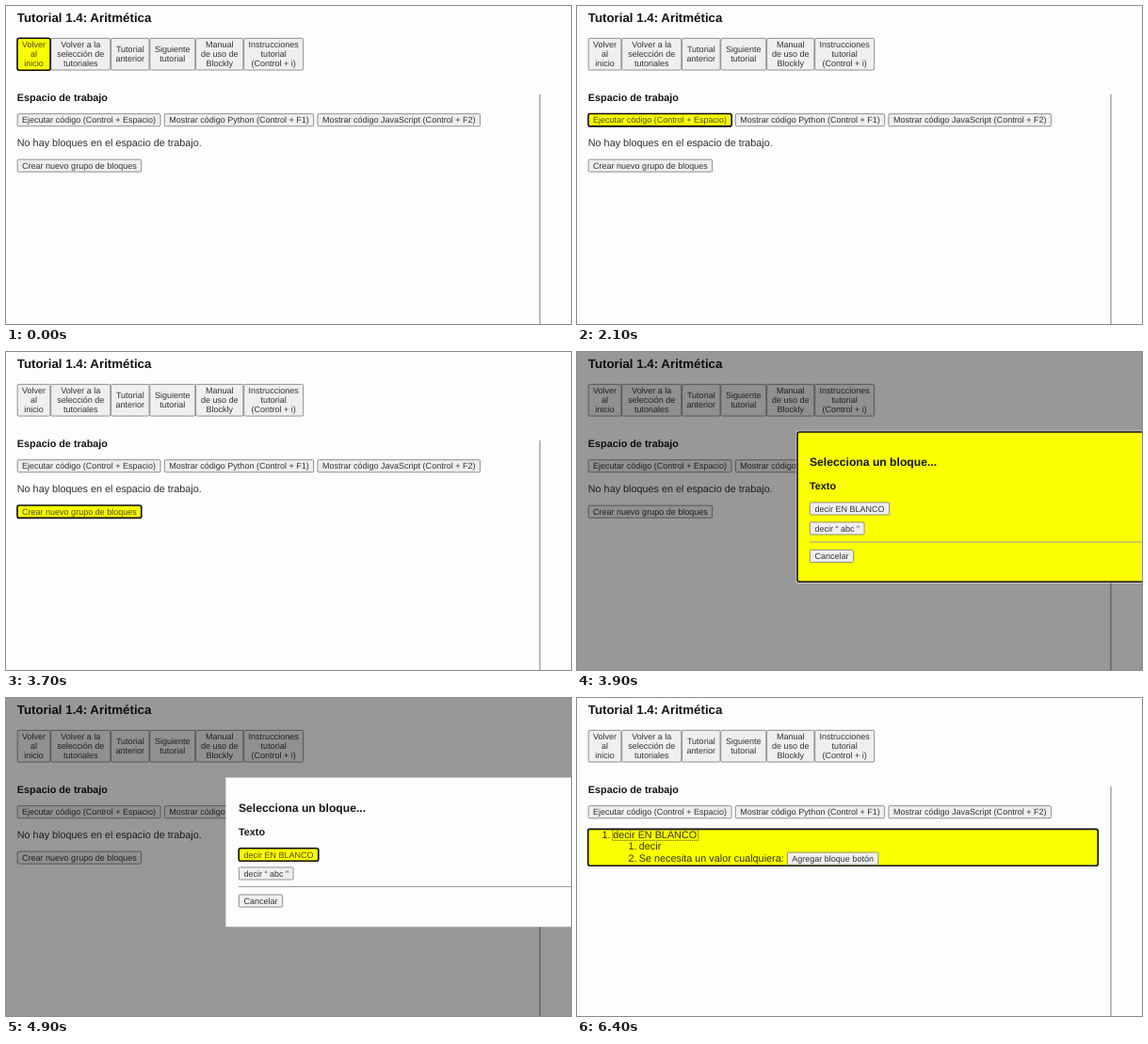
Recreate the animation shown at these times as an HTML page. Size 600 px wide and 338 px high, loop 6500 ms.

```html
<!DOCTYPE html>
<html lang="es">
<head>
<meta charset="utf-8">
<title>Tutorial</title>
<style>
  html, body { margin: 0; width: 100%; height: 100%; overflow: hidden; background: #fdfdfd; }
  svg { display: block; width: 600px; height: 338px; }
  text { font-family: "Liberation Sans", Arial, sans-serif; font-size: 10.82px; fill: #2c2c2c;
         text-rendering: geometricPrecision; white-space: pre; }
  .h { font-weight: bold; fill: #151515; }
  .b { font-size: 9.02px; fill: #333; text-anchor: middle; }
  .b.on { fill: #4a4600; }
  .list { fill: #333000; }
</style>
</head>
<body>
<svg id="stage" viewBox="0 0 600 338"></svg>
<script>
const LOOP = 6500;
const YELLOW = '#fbff00';

// [start in ms, focused item]
const STEPS = [
  [0, 'start'], [100, 'select'], [400, 'prev'], [800, 'next'], [1100, 'manual'],
  [1500, 'help'], [1800, 'run'], [2200, 'python'], [2500, 'js'], [2900, 'create'],
  [3900, 'dialog'], [4800, 'blank'], [6100, 'tree']
];

// [id, left, right, lines]
const NAV = [
  ['start', 11.8, 47.3, 'Volver|al|inicio'],
  ['select', 47.3, 111.2, 'Volver a la|selección de|tutoriales'],
  ['prev', 111.2, 152.4, 'Tutorial|anterior'],
  ['next', 152.4, 201.2, 'Siguiente|tutorial'],
  ['manual', 201.2, 252.3, 'Manual|de uso de|Blockly'],
  ['help', 252.3, 316, 'Instrucciones|tutorial|(Control + i)']
];
const TOOLS = [
  ['run', 11.8, 164.4, 'Ejecutar código (Control + Espacio)'],
  ['python', 168, 327, 'Mostrar código Python (Control + F1)'],
  ['js', 330.6, 503.8, 'Mostrar código JavaScript (Control + F2)']
];

const box = (x, y, w, h, attrs) =>
  `<rect x="${x}" y="${y}" width="${w}" height="${h}" ${attrs}/>`;

const text = (x, y, s, cls = '', size = 0) =>
  `<text x="${x}" y="${y}" class="${cls}"${size ? ` style="font-size:${size}px"` : ''}>${s}</text>`;

const ring = (x, y, w, h) =>
  box(x, y, w, h, `rx="2" fill="${YELLOW}" stroke="#0a0a0a" stroke-width="1.6"`);

function button(focus, [id, left, right, label], top, height) {
  const on = id === focus;
  const w = right - left;
  const lines = label.split('|');
  const first = top + height / 2 + 3.1 - (lines.length - 1) * 5.07;
  const frame = on
    ? ring(left + .2, top + .2, w - .4, height - .4)
    : box(left + .35, top + .35, w - .7, height - .7,
          'rx="1.2" fill="#efefef" stroke="#767676" stroke-width=".8"');
  return frame + lines.map((s, i) =>
    text((left + right) / 2, first + i * 10.14, s, on ? 'b on' : 'b')).join('');
}

function emptySpace(focus) {
  return text(11.8, 149, 'No hay bloques en el espacio de trabajo.') +
    button(focus, ['create', 11.8, 144, 'Crear nuevo grupo de bloques'], 162.8, 13.8);
}

function tree() {
  return ring(11.7, 139.4, 541.5, 38.8) +
    box(37.8, 139.9, 91, 11.4, 'fill="none" stroke="#333000" stroke-width=".9" stroke-dasharray="1 1"') +
    text(26.5, 149.2, '1.', 'list') + text(38.2, 149.2, 'decir EN BLANCO', 'list') +
    text(54.4, 160.7, '1.', 'list') + text(65.8, 160.7, 'decir', 'list') +
    text(54.4, 173.9, '2.', 'list') +
    text(65.8, 173.9, 'Se necesita un valor cualquiera:', 'list') +
    button('', ['add', 223, 320.2, 'Agregar bloque botón'], 163.8, 13.8);
}

function dialog(focus) {
  const on = focus === 'dialog';
  const drop = on ? 1 : 0;
  const panel = on
    ? box(232.7, 83.7, 380, 161.8, 'rx="2.5" fill="#fff"') + ring(234, 85, 380, 159.2)
    : box(233.4, 84.6, 380, 158.6, 'fill="#fdfdfd"');
  return box(0, 0, 600, 338, 'opacity=".4"') + panel +
    text(247, 121, 'Selecciona un bloque...', 'h', 12.17) +
    text(247, 145.8, 'Texto', 'h') +
    button(focus, ['blank', 247, 332, 'decir EN BLANCO'], 159.6, 13.8) +
    button(focus, ['abc', 247, 305.4, 'decir “ abc ”'], 179.6 + drop, 13.8) +
    box(247, 200 + drop * 1.5, 353, 1.1, 'fill="#a2a2a2"') +
    button(focus, ['cancel', 247, 294, 'Cancelar'], 208.7 + drop * 1.3, 13.8);
}

function scene(focus) {
  // The focused button goes last so its ring stays above its neighbours.
  const nav = [...NAV].sort((a, b) => (a[0] === focus) - (b[0] === focus));
  return box(0, 0, 600, 338, 'fill="#fdfdfd"') +
    text(11.8, 17.2, 'Tutorial 1.4: Aritmética', 'h', 13.3) +
    nav.map(b => button(focus, b, 34, 34.4)).join('') +
    text(11.8, 100.8, 'Espacio de trabajo', 'h') +
    TOOLS.map(b => button(focus, b, 114.3, 13.8)).join('') +
    box(566.2, 94, 1.5, 244, 'fill="#a6a6a6"') +
    (focus === 'tree' ? tree() : emptySpace(focus)) +
    (focus === 'dialog' || focus === 'blank' ? dialog(focus) : '');
}

const stage = document.getElementById('stage');
const begin = performance.now();
let shown = '';

function draw() {
  const t = (performance.now() - begin) % LOOP;
  const focus = STEPS.filter(([at]) => at <= t).pop()[1];
  if (focus !== shown) {
    stage.innerHTML = scene(focus);
    shown = focus;
  }
  requestAnimationFrame(draw);
}
draw();
</script>
</body>
</html>
```
